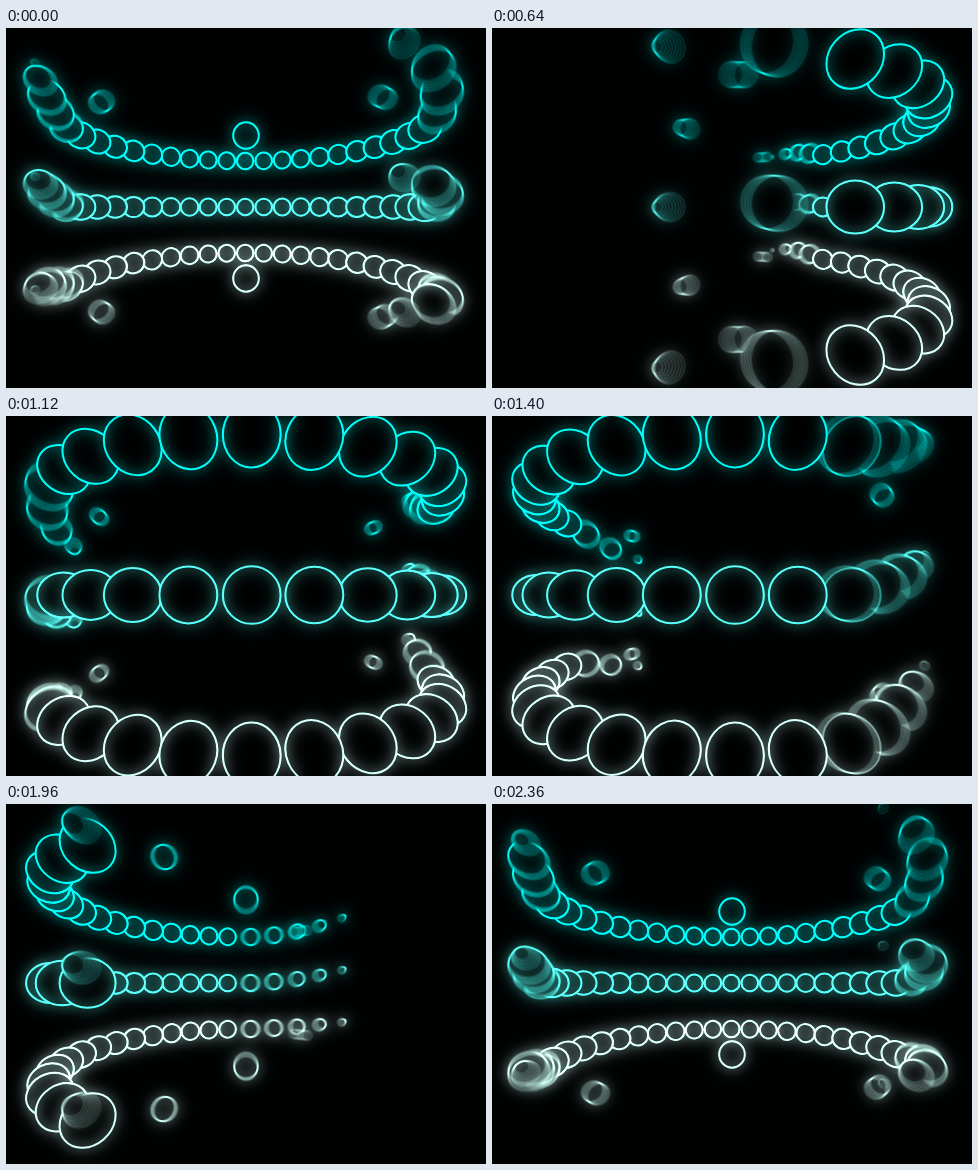
Animation of 480 by 360 pixels, one loop 2400 ms. Source, as an HTML page with a canvas:

```html
<!DOCTYPE html>
<html lang="en">
<head>
<meta charset="utf-8">
<title>Rings</title>
<style>
  html, body { margin: 0; width: 100%; height: 100%; overflow: hidden; background: #000202; }
  canvas { display: block; width: 480px; height: 360px; }
</style>
</head>
<body>
<canvas id="stage" width="480" height="360"></canvas>
<script>
const W = 480, H = 360, LOOP = 2400;
const FOCAL = 297, DIST = 4.155, RADIUS = 2.304, BALL = 0.179;
const FADE = 220, HALF = 0.8, SHUTTER = 36, SAMPLES = 8;
const COLORS = ['#00ebe4', '#55f5ea', '#cdfaf0'];

const clamp = v => Math.max(0, Math.min(1, v));
const mod = (v, n) => ((v % n) + n) % n;
const rad = deg => deg * Math.PI / 180;
const turn = t => 2 * Math.PI * t / LOOP;

// Edges of the populated arc in degrees: 0 is the far side, 90 the right.
const spread = t => 100 + 23.5 * Math.cos(turn(t)) + 15.5 * Math.cos(2 * turn(t));
const front = t => 360 * t / LOOP + spread(t);
const rear = t => 360 * t / LOOP - spread(t) + 5;

// Time at which a rising edge passes an angle.
function crossing(edge, deg) {
  let lo = -2 * LOOP, hi = 2 * LOOP;
  for (let i = 0; i < 30; i++) {
    const mid = (lo + hi) / 2;
    if (edge(mid) < deg) lo = mid; else hi = mid;
  }
  return mod(lo, LOOP);
}

// Balls arrive from further along the ring and leave in the same direction.
function column(deg) {
  const s = Math.sin(rad(deg)), along = 0.55 * Math.cos(rad(deg));
  return {
    deg, radius: RADIUS, rings: [-1, 0, 1],
    born: crossing(front, deg), gone: crossing(rear, deg),
    from: [along, -0.45 * s, -0.4 * s],
    to: [along, -0.45 * Math.abs(s), -0.4 * s]
  };
}

function hub(ring) {
  return {
    deg: 0, radius: 0, rings: [ring], born: 1879, gone: 665,
    from: [0, 0.4 * ring, 0], to: [-0.95, 0.15 * ring, 0]
  };
}

const columns = Array.from({ length: 36 }, (_, i) => column(i * 10)).concat(hub(-1), hub(1));

// How far a column has drifted (0..1), and which way.
function life(c, t) {
  const age = mod(t - c.born + FADE, LOOP) - FADE;
  const span = mod(c.gone - c.born, LOOP);
  return age < span / 2
    ? [clamp(HALF - age / FADE), c.from]
    : [clamp(HALF + (age - span) / FADE), c.to];
}

function project(x, y, z, r, ring) {
  const depth2 = z * z - r * r, minor = FOCAL * r / Math.sqrt(depth2);
  return {
    x: W / 2 + FOCAL * x / z, y: H / 2 - 1 + FOCAL * y / z, z, minor,
    major: minor * Math.sqrt(1 + (x * x + y * y) / depth2),
    tilt: Math.atan2(y, x), color: COLORS[ring + 1]
  };
}

function balls(t) {
  const list = [], yaw = 0.6 + 0.6 * Math.sin(turn(t) - 0.3);
  for (const c of columns) {
    const [drift, dir] = life(c, t), size = 1 - drift ** 3;
    if (size < 0.02) continue;
    const a = rad(c.deg - yaw);
    const x = c.radius * Math.sin(a) + dir[0] * drift;
    const z = DIST + c.radius * Math.cos(a) + dir[2] * drift;
    for (const ring of c.rings) list.push(project(x, ring + dir[1] * drift, z, BALL * size, ring));
  }
  // Small companions just inside both edges.
  for (const edge of [front, rear]) {
    const a = rad(edge(t)), r = 0.83 * RADIUS;
    for (const ring of [-1, 1]) {
      list.push(project(r * Math.sin(a), ring, DIST + r * Math.cos(a), BALL / 2, ring));
    }
  }
  return list.sort((a, b) => b.z - a.z);
}

function layer() {
  const c = document.createElement('canvas');
  c.width = W;
  c.height = H;
  return c.getContext('2d');
}

const stage = document.getElementById('stage').getContext('2d');
const still = layer(), blend = layer();

function drawStill(t) {
  still.fillStyle = '#000';
  still.fillRect(0, 0, W, H);
  still.lineWidth = 2;
  for (const b of balls(t)) {
    still.beginPath();
    still.ellipse(b.x, b.y, b.major, b.minor, b.tilt, 0, 2 * Math.PI);
    still.fill();
    still.strokeStyle = b.color;
    still.stroke();
  }
}

function add(blur, alpha) {
  stage.filter = blur ? `blur(${blur}px)` : 'none';
  stage.globalAlpha = alpha;
  stage.drawImage(blend.canvas, 0, 0);
}

function render(t) {
  // Average several instants for motion blur.
  for (let i = 0; i < SAMPLES; i++) {
    drawStill(mod(t + SHUTTER * ((i + 0.5) / SAMPLES - 0.5), LOOP));
    blend.globalAlpha = 1 / (i + 1);
    blend.drawImage(still.canvas, 0, 0);
  }
  stage.globalCompositeOperation = 'source-over';
  stage.filter = 'none';
  stage.globalAlpha = 1;
  stage.fillStyle = '#000202';
  stage.fillRect(0, 0, W, H);
  stage.globalCompositeOperation = 'lighter';
  add(0, 0.9);
  add(5, 0.5);
  add(8, 0.8);
}

const start = performance.now();
function frame() {
  render((performance.now() - start) % LOOP);
  requestAnimationFrame(frame);
}
frame();
</script>
</body>
</html>
```
